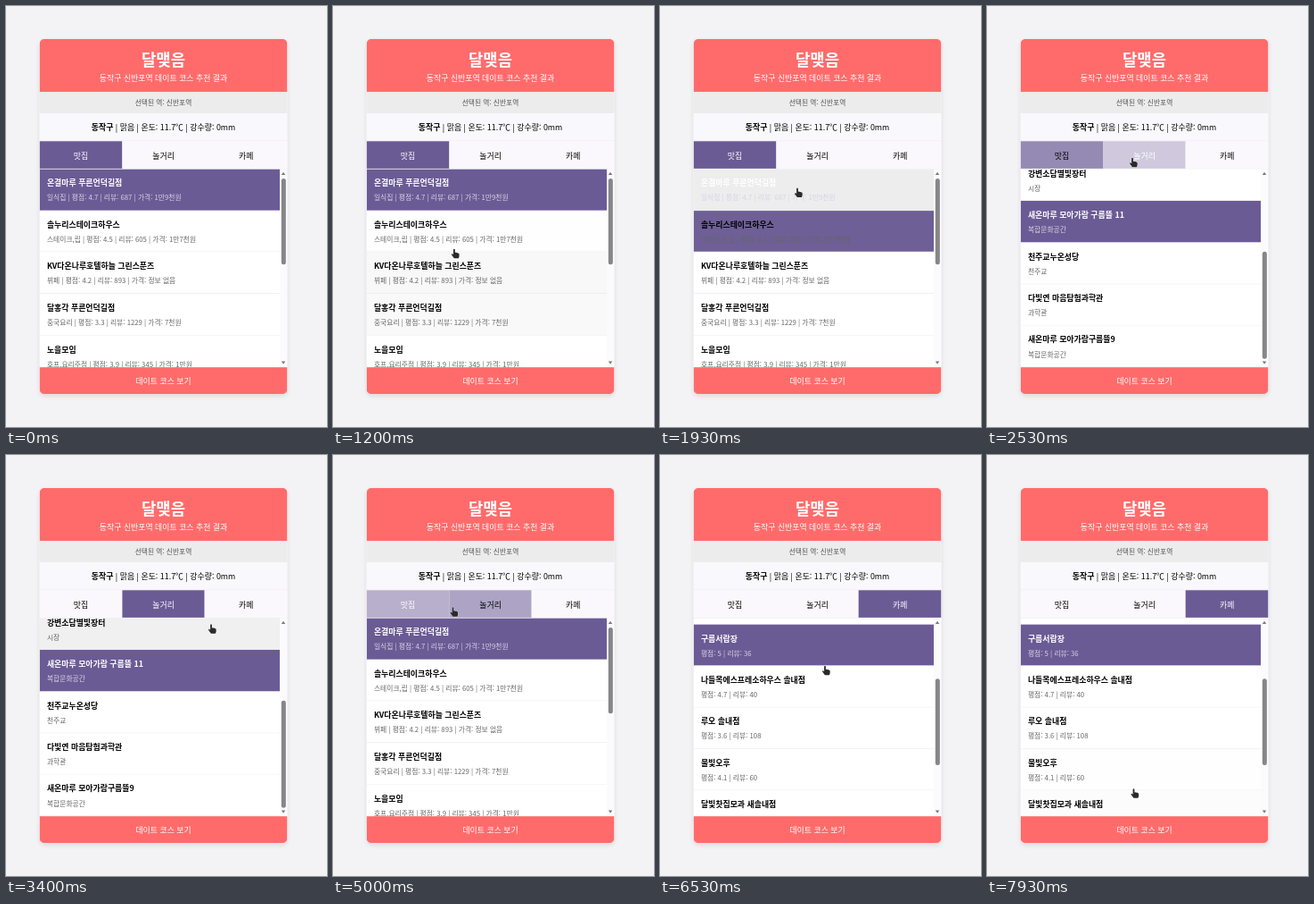
These frames come from a looping animation (360x471 px, 8000 ms). An HTML page:

```html
<!DOCTYPE html>
<html lang="ko">
<head>
<meta charset="utf-8">
<title>데이트 코스 추천</title>
<style>
html, body { margin: 0; width: 100%; height: 100%; overflow: hidden; background: #f3f2f5; }
body { position: relative; color: #000; font: 16px/28px "Noto Sans CJK KR", "Noto Sans KR", "Noto Sans CJK JP", "Noto Sans CJK", sans-serif; }
div, svg { position: absolute; }
.card { left: 0; top: 0; width: 500px; height: 715px; border-radius: 10px; background: #fff; overflow: hidden; box-shadow: 0 4px 10px rgba(0,0,0,.1); transform-origin: 0 0; }
.band { left: 0; width: 100%; box-sizing: border-box; text-align: center; white-space: nowrap; }
.band div { left: 0; width: 100%; }
.header { top: 0; height: 107px; background: #ff6b6b; color: #fff; }
.header .title { top: 26px; font-size: 32px; font-weight: 700; }
.header .sub { top: 64px; }
.station { top: 107px; height: 43px; line-height: 41px; background: #ececec; color: #555; font-size: 14px; }
.weather { top: 150px; height: 56px; line-height: 53px; background: #f9f8fc; border-bottom: 1px solid #e4e3e8; }
.tabs { top: 206px; height: 56px; line-height: 56px; background: #faf8fc; border-bottom: 1px solid #e4e3e8; }
.tabs div { width: 33.34%; height: 55px; }
.list { left: 0; top: 262px; width: 500px; height: 399px; overflow: hidden; }
.item { left: 0; width: 485px; height: 83.7px; border-bottom: 1px solid #e4e3e8; box-sizing: border-box; white-space: nowrap; }
.item div { left: 15px; }
.name { top: 13px; font-weight: 700; }
.meta { top: 43px; font-size: 14px; }
.bar { right: 0; top: 0; width: 15px; height: 100%; background: #fbfafc; }
.thumb { left: 3px; width: 9px; border-radius: 4.5px; background: #868588; }
.arrow { left: 3px; border: 4.5px solid transparent; }
.up { top: 2px; border-bottom: 6px solid #7a797c; }
.down { bottom: 2px; border-top: 6px solid #7a797c; }
.footer { top: 661px; height: 54px; line-height: 55px; background: #ff6b6b; color: #fff; }
#cursor { left: 0; top: 0; width: 1px; height: 1px; overflow: visible; }
#cursor path { fill: #2a2a2a; stroke: #fff; stroke-width: .6; paint-order: stroke; stroke-linejoin: round; }
</style>
</head>
<body>
<div class="card">
  <div class="band header"><div class="title">달맺음</div><div class="sub">동작구 신반포역 데이트 코스 추천 결과</div></div>
  <div class="band station">선택된 역: 신반포역</div>
  <div class="band weather"><b>동작구</b> | 맑음 | 온도: 11.7℃ | 강수량: 0mm</div>
  <div class="band tabs"></div>
  <div class="list"></div>
  <div class="band footer">데이트 코스 보기</div>
</div>
<svg id="cursor">
  <path id="hand" transform="scale(.9)" d="M-1 1q1-1.4 2 0v4q1.5-.9 2.1.3 1.4-.6 1.9.6 1.3-.2 1.3 1v2.6l-.8 2.5h-5.6l-3.2-4.4q0-1.5 1.3-1l1 .9z"/>
  <path id="pointer" d="M0 0v9.6l2.2-2 1.5 3.3 1.5-.7-1.5-3.2h3z"/>
</svg>
<script>
const LOOP = 8000, STEP = 200 / 3, FADE = 300;
// Card placement on the stage; everything inside it is measured in card units
const CARD = { x: 37.6, y: 36.8, scale: 0.5558 };
const ITEM = 83.7;
const LIST = { y: 262, w: 485, h: 399 };
const TRACK = { y: 18.7, h: 363.4 };
const PURPLE = [107, 91, 149], WHITE = [255, 255, 255], HOVER = [240, 240, 240], TAB = [250, 248, 252];

// first: index of the first listed place; total: places in the full scroll area
const tabs = [
  { label: '맛집', total: 10, first: 0, scroll: 0, picks: [[0, 0], [1330, 1], [1930, 0]], items: [
    ['온결마루 푸른언덕길점', '일식집 | 평점: 4.7 | 리뷰: 687 | 가격: 1만9천원'],
    ['솔누리스테이크하우스', '스테이크,립 | 평점: 4.5 | 리뷰: 605 | 가격: 1만7천원'],
    ['KV다온나루호텔하늘 그린스푼즈', '뷔페 | 평점: 4.2 | 리뷰: 893 | 가격: 정보 없음'],
    ['달홍각 푸른언덕길점', '중국요리 | 평점: 3.3 | 리뷰: 1229 | 가격: 7천원'],
    ['노을모임', '호프,요리주점 | 평점: 3.9 | 리뷰: 345 | 가격: 1만원'] ] },
  { label: '놀거리', total: 8, first: 3, scroll: 270.6, picks: [[0, 1]], items: [
    ['강변소담별빛장터', '시장'],
    ['새온마루 모아가람 구름뜰 11', '복합문화공간'],
    ['천주교누온성당', '천주교'],
    ['다빛연 마음탐험과학관', '과학관'],
    ['새온마루 모아가람구름뜰9', '복합문화공간'] ] },
  { label: '카페', total: 10, first: 3, scroll: 238.6, picks: [[0, 0]], items: [
    ['구름서랍장', '평점: 5 | 리뷰: 36'],
    ['나들목에스프레소하우스 솔내점', '평점: 4.7 | 리뷰: 40'],
    ['루오 솔내점', '평점: 3.6 | 리뷰: 108'],
    ['물빛오후', '평점: 4.1 | 리뷰: 60'],
    ['달빛찻집모과 새솔내점', ''] ] }
];
const tabClicks = [[0, 0], [2485, 1], [4920, 0], [5950, 2]];

// time, x, y of the cursor tip on the stage
const path = [
  [0, -12, 462], [250, -8, 455], [870, 26, 411], [1280, 148, 256], [1350, 148, 252],
  [1480, 153, 214], [1730, 154, 205], [2000, 154, 203], [2400, 163, 170], [2533, 163, 169.5],
  [2750, 166, 171], [3400, 230, 189], [3750, 262, 240], [4200, 230, 262], [4450, 170, 230],
  [4860, 106, 169], [4920, 110, 169], [5000, 134.5, 170], [5400, 205, 170], [5850, 266, 170],
  [6000, 266, 171], [6530, 185, 235.5], [6930, 180, 300], [7350, 190, 385], [7600, 200, 445],
  [7800, 202, 455], [7933, 164.5, 373]
];

const $ = s => document.querySelector(s);
const mix = (a, b, p) => a.map((v, i) => v + (b[i] - v) * p);
const rgb = c => `rgb(${c.map(Math.round)})`;

function add(parent, cls, text = '') {
  const el = document.createElement('div');
  el.className = cls;
  el.textContent = text;
  return parent.appendChild(el);
}

$('.card').style.transform = `translate(${CARD.x}px, ${CARD.y}px) scale(${CARD.scale})`;
tabs.forEach((tab, i) => {
  tab.button = add($('.tabs'), 'tab', tab.label);
  tab.button.style.left = i * 100 / 3 + '%';
  tab.pane = add($('.list'), 'pane');
  tab.rows = tab.items.map(([name, meta], k) => {
    const el = add(tab.pane, 'item'), top = (tab.first + k) * ITEM - tab.scroll;
    el.style.top = top + 'px';
    return { el, top, name: add(el, 'name', name), meta: add(el, 'meta', meta) };
  });
});
const bar = add($('.list'), 'bar');
add(bar, 'arrow up');
add(bar, 'arrow down');
const thumb = add(bar, 'thumb');

// Current choice in a click history, and how far each option is faded in
function choice(clicks, t) {
  const k = clicks.findLastIndex(c => c[0] <= t);
  const left = 1 - Math.min(1, (t - clicks[k][0]) / FADE);
  const p = k ? 1 - left * left : 1;
  const now = clicks[k][1], before = k ? clicks[k - 1][1] : -1;
  return { now, amount: i => i === now ? p : i === before ? 1 - p : 0 };
}

function cursorAt(t) {
  const k = path.findIndex(p => p[0] > t);
  if (k < 0) return path.at(-1).slice(1);
  if (!k) return path[0].slice(1);
  const [a, b] = [path[k - 1], path[k]];
  const u = (t - a[0]) / (b[0] - a[0]);
  return mix(a, b, u * u * (3 - 2 * u)).slice(1);
}

function toCard([x, y]) {
  return [(x - CARD.x) / CARD.scale, (y - CARD.y) / CARD.scale];
}

// Share of the last 200 ms that the cursor spent on a row
function hover(row, t) {
  let hits = 0;
  for (let i = 0; i < 10; i++) {
    const [x, y] = toCard(cursorAt(t - i * 20)), dy = y - LIST.y;
    if (x > 0 && x < LIST.w && dy > 0 && dy < LIST.h && dy >= row.top && dy < row.top + ITEM) hits++;
  }
  return hits / 10;
}

function render(t) {
  const active = choice(tabClicks, t);
  tabs.forEach((tab, i) => {
    const on = i === active.now;
    tab.button.style.background = rgb(mix(TAB, PURPLE, active.amount(i)));
    tab.button.style.color = on ? '#fff' : '#000';
    tab.pane.style.display = on ? 'block' : 'none';
    if (!on) return;

    const picked = choice(tab.picks, t);
    tab.rows.forEach((row, k) => {
      const base = mix(WHITE, HOVER, hover(row, t)), chosen = k === picked.now;
      row.el.style.background = rgb(mix(base, PURPLE, picked.amount(k)));
      row.name.style.color = chosen ? '#fff' : '#000';
      row.meta.style.color = chosen ? '#d8d2e4' : '#666';
    });
    const content = tab.total * ITEM;
    thumb.style.top = TRACK.y + TRACK.h * tab.scroll / content + 'px';
    thumb.style.height = TRACK.h * LIST.h / content + 'px';
  });

  const [x, y] = cursorAt(t), [cx, cy] = toCard([x, y]);
  const clickable = cx > 0 && cx < 500 && cy > 206 && cy < 715;
  $('#cursor').style.transform = `translate(${x}px, ${y}px)`;
  $('#hand').style.display = clickable ? '' : 'none';
  $('#pointer').style.display = clickable ? 'none' : '';
}

const start = performance.now();
function tick() {
  const t = (performance.now() - start) % LOOP;
  render(Math.floor((t + 4) / STEP) * STEP % LOOP);
  requestAnimationFrame(tick);
}
tick();
</script>
</body>
</html>
```
